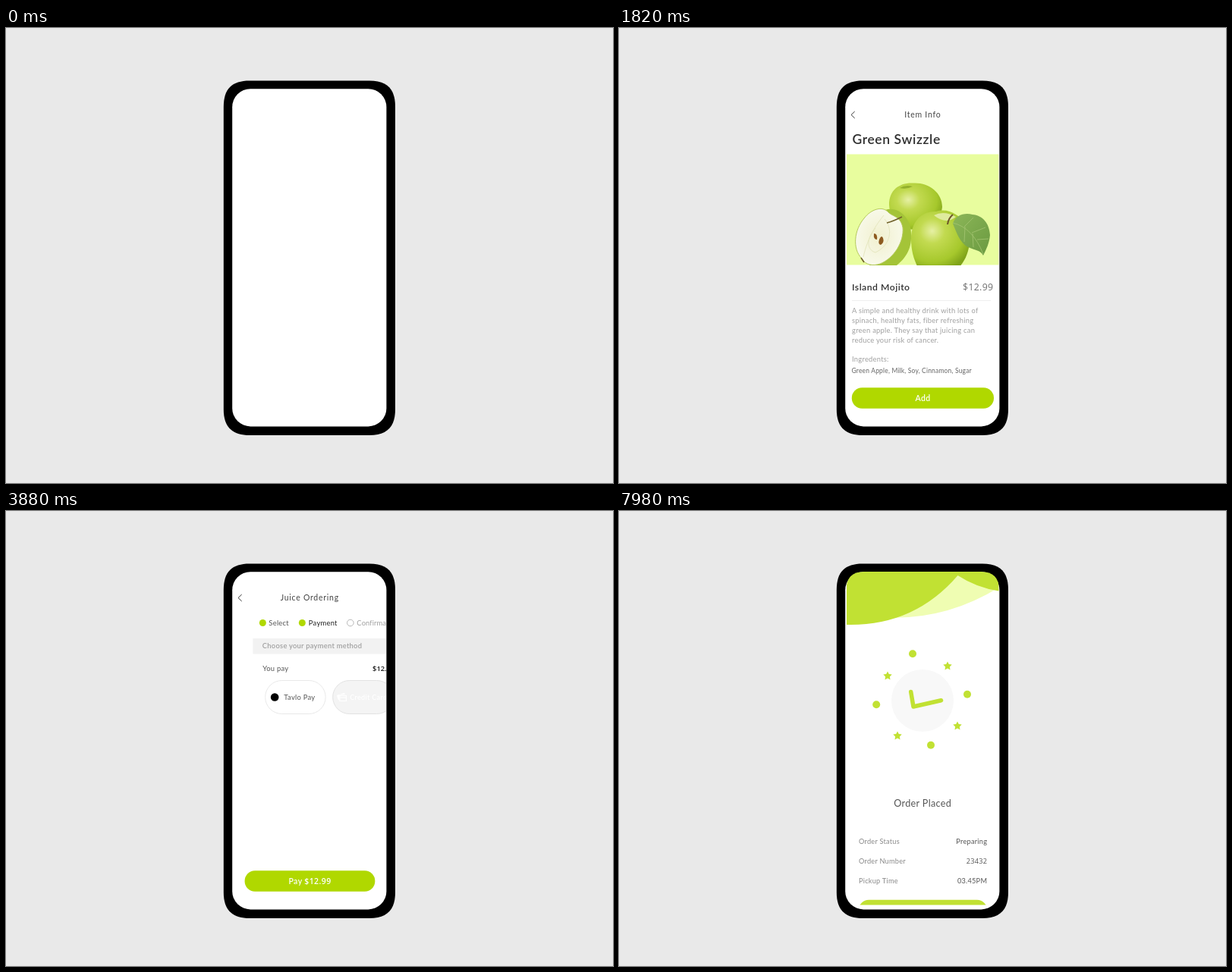
An HTML page for the animation above (8 s loop, 800 by 600 pixels).

```html
<!DOCTYPE html>
<html lang="en">
<head>
<meta charset="utf-8">
<title>Juice ordering</title>
<style>
html, body { margin: 0; width: 100%; height: 100%; overflow: hidden; background: #e9e9e9; }
svg { display: block; width: 100vw; height: 100vh; }
text { font: 9.4px Lato, "Open Sans", sans-serif; letter-spacing: .25px; fill: #555; }
.bold { font-weight: 600; }
.num { font-family: "Open Sans", sans-serif; }
.mid { text-anchor: middle; }
.end { text-anchor: end; }
.pale { fill: #a0a0a0; }
.head { font-size: 10.5px; letter-spacing: .75px; fill: #444; }
.title { font-size: 17.5px; letter-spacing: .6px; fill: #2f2f2f; }
.name { font-size: 12.2px; letter-spacing: .5px; fill: #2f2f2f; }
.price { font-size: 12.3px; letter-spacing: .3px; fill: #707070; }
.small { font-size: 8.5px; letter-spacing: .18px; fill: #666; }
.cta { font-size: 10.5px; letter-spacing: .4px; fill: #fff; }
.row { font-size: 9.2px; fill: #888; }
.value { fill: #555; }
.line { fill: none; stroke: #e8e8e8; }

/* One 8 s loop: 1% is 80 ms. */
.a { animation: 8s cubic-bezier(.33, 1, .68, 1) infinite; }
.header { animation-name: drop, show-app; }
.item { animation-name: show-item; }
.fall { animation-name: drop; }
.photo { animation-name: show-photo; }
.backdrop { animation-name: grow; transform-box: fill-box; transform-origin: 0 0; }
.fruit { animation-name: lower; }
.info { animation-name: rise, show-item; }
.button { animation-name: rise-button, show-app; }
.pill { animation-name: narrow; }
.quantity { animation-name: show-quantity; }
.payment { animation-name: show-payment; }
.slide { animation-name: slide; }
.chosen { animation-name: choose; }
.form { animation-name: show-form; }
.order { animation-name: show-order; }
.waves { animation-name: pour; }
.rows { animation-name: lift; }
.badge { animation-name: spin; transform-origin: 400px 250px; }

@keyframes drop { 0%, 7.1% { transform: translateY(-37px); } 17.1%, 100% { transform: none; } }
@keyframes rise {
  0%, 7.1% { transform: translateY(189px); }
  17.1%, 27.5% { transform: none; }
  34.5%, 100% { transform: translateY(189px); }
}
@keyframes rise-button { 0%, 7.1% { transform: translateY(240px); } 17.1%, 100% { transform: none; } }
@keyframes grow {
  0%, 27.5% { transform: translateY(0) scaleY(1); }
  34.5%, 100% { transform: translateY(-86.5px) scaleY(2.5205); }
}
@keyframes lower { 0%, 27.5% { transform: none; } 34.5%, 100% { transform: translateY(135.5px); } }
@keyframes narrow {
  0%, 27.5% { x: 306.8px; width: 187.2px; }
  34.5%, 43.5% { x: 306.3px; width: 187.2px; }
  53.5%, 100% { x: 315.8px; width: 169.5px; }
}
@keyframes slide { 0%, 43.5% { transform: translateX(200px); } 53.5%, 100% { transform: none; } }
@keyframes choose {
  0%, 64.7% { fill: #f4f4f4; stroke: #e2e2e2; }
  69.25%, 100% { fill: #b0d800; stroke: #b0d800; }
}
@keyframes pour { 0%, 97.25% { transform: translateY(-75px); } 99.75%, 100% { transform: none; } }
@keyframes lift { 0%, 97.25% { transform: translateY(55px); } 99.75%, 100% { transform: none; } }
@keyframes spin { 0%, 97.25% { transform: rotate(-50deg) scale(.5); } 99.75%, 100% { transform: none; } }

@keyframes show-app { 0%, 7.1% { opacity: 0; } 9.5%, 97.25% { opacity: 1; } 98.75%, 100% { opacity: 0; } }
@keyframes show-item { 0%, 7.1% { opacity: 0; } 9.5%, 27.5% { opacity: 1; } 31%, 100% { opacity: 0; } }
@keyframes show-photo { 0%, 7.1% { opacity: 0; } 9.5%, 43.5% { opacity: 1; } 48%, 100% { opacity: 0; } }
@keyframes show-quantity { 0%, 28.5% { opacity: 0; } 33%, 43.5% { opacity: 1; } 46.5%, 100% { opacity: 0; } }
@keyframes show-payment { 0%, 43.8% { opacity: 0; } 47.5%, 97.25% { opacity: 1; } 98.75%, 100% { opacity: 0; } }
@keyframes show-form { 0%, 64.75% { opacity: 0; } 69.25%, 100% { opacity: 1; } }
@keyframes show-order { 0%, 97.25% { opacity: 0; } 99%, 100% { opacity: 1; } }
</style>
</head>
<body>
<svg viewBox="0 0 800 600">
  <defs>
    <clipPath id="screen"><path d="M299.5 104Q299.5 80 323 80H477Q501 80 501 104V519.5H299.5Z"/></clipPath>
    <clipPath id="frame"><rect x="300" y="160" width="200.5" height="152.5"/></clipPath>
    <radialGradient id="skin" cx=".36" cy=".36" r=".72">
      <stop offset="0" stop-color="#e6f0a4"/>
      <stop offset=".3" stop-color="#c2da50"/>
      <stop offset=".75" stop-color="#a6c82c"/>
      <stop offset="1" stop-color="#7fa318"/>
    </radialGradient>
    <radialGradient id="flesh">
      <stop offset="0" stop-color="#f1f0cf"/>
      <stop offset="1" stop-color="#f8f9e9"/>
    </radialGradient>
    <linearGradient id="leaf" x2="1" y2="1">
      <stop offset="0" stop-color="#8cb658"/>
      <stop offset="1" stop-color="#6a9a40"/>
    </linearGradient>
    <path id="star" fill="#c1e133" d="M0-6 1.8-2.4 5.7-1.9 2.9.9 3.5 4.9 0 3-3.5 4.9-2.9.9-5.7-1.9-1.8-2.4Z"/>
    <circle id="dot" r="5" fill="#c1e133"/>
  </defs>

  <rect width="800" height="600" fill="#e9e9e9"/>
  <path d="M286.800 104C286.800 80 298 69.500 321 69.500H479C502 69.500 513 80 513 104V503C513 526 502 537 479 537H321C298 537 286.800 526 286.800 503Z"/>
  <rect x="298.200" y="80.200" width="203.200" height="445.200" rx="24" fill="#fff"/>

  <g clip-path="url(#screen)">
    <g class="a photo"><g class="a fall">
      <rect class="a backdrop" x="300" y="166.5" width="200.5" height="146" fill="#e8fd9e"/>
      <g class="a fruit"><g clip-path="url(#frame)">
        <path fill="url(#skin)" d="M356 233C356 214 369 204 387 204.500C407 203 426 216 426 236C424 254 411 266 393 266C371 266 357 253 356 233Z"/>
        <path fill="#93b02c" d="M370 211Q378 206 387 209Q379 213 370 211Z"/>
        <path fill="#a4c438" d="M351 240C367 234 386 250 385 273C386 293 376 305 366 313H330Z"/>
        <path fill="url(#flesh)" stroke="#b3c85a" d="M320 304C307 291 310 266 323 251C332 239 347 234 355 243C361 249 371 248 374 263C376 282 362 304 344 311C335 314 325 313 320 304Z"/>
        <path fill="none" stroke="#e6e7c0" d="M349 247C340 258 328 275 322 302M350 252C361 264 359 286 338 296C327 293 325 279 338 264"/>
        <path fill="#8d5a20" d="M336 271Q341 271 340 279Q335 279 336 271ZM343 279Q346 272 348 277Q350 283 345 286Q341 285 343 279Z"/>
        <path fill="none" stroke="#71622c" stroke-width="1.600" d="M353 257Q361 255 373 249M319 303 323 309"/>
        <path fill="url(#skin)" d="M385 278C385 255 399 241 418 242C426 239 437 241 444 246C457 253 463 268 462 284C460 299 455 308 448 316H394C388 304 385 293 385 278Z"/>
        <path fill="#dfeb9e" d="M415 247Q428 240 444 249Q431 260 415 247Z"/>
        <path fill="none" stroke="#6d552a" stroke-width="2" d="M433 259Q434 251 440 246"/>
        <path fill="url(#leaf)" d="M440 258C443 247 455 243 466 246C479 247 488 257 489 273C488 284 484 292 480 300C477 293 469 293 460 289C449 283 445 270 440 258Z"/>
        <path fill="none" stroke="#a5c673" stroke-width=".8" d="M440 257Q466 263 480 298M455 262 467 250M465 270 483 263M472 279 487 278M456 262 455 282M466 271 467 289"/>
      </g></g>
    </g></g>

    <g class="a header">
      <path fill="none" stroke="#333" d="M310.700 110 306 114.500 310.700 119"/>
      <g class="a item">
        <text class="head mid" x="400.300" y="118">Item Info</text>
        <text class="title bold" x="307.500" y="153.200">Green Swizzle</text>
      </g>
    </g>

    <g class="a info">
      <text class="name bold" x="307" y="346">Island Mojito</text>
      <text class="price num end" x="493.300" y="346">$12.99</text>
      <path stroke="#efefef" d="M307 359.500H490"/>
      <text class="pale" x="307" y="376.300">A simple and healthy drink with lots of</text>
      <text class="pale" x="307" y="389.300">spinach, healthy fats, fiber refreshing</text>
      <text class="pale" x="307" y="402.300">green apple. They say that juicing can</text>
      <text class="pale" x="307" y="415.300">reduce your risk of cancer.</text>
      <text class="pale" x="307" y="439.800">Ingredents:</text>
      <text class="small" x="306.500" y="454.800">Green Apple, Milk, Soy, Cinnamon, Sugar</text>
    </g>

    <g class="a quantity">
      <text class="head mid" x="400.300" y="118">Select Quantity</text>
      <text class="bold mid" style="font-size:16.5px;letter-spacing:.6px;fill:#262b16" x="400.300" y="172.500">Island Mojito</text>
      <text class="bold num mid" style="font-size:26.5px;letter-spacing:.4px;fill:#262b16" x="400.500" y="213">$12.99</text>
      <rect x="357.300" y="238.500" width="86.500" height="24.500" rx="12.250" fill="none" stroke="#4c5530" stroke-width=".8"/>
      <path stroke="#8b9764" d="M366.500 251H374.500"/>
      <path stroke="#4c5530" d="M426 251H434M430 247V255"/>
      <text class="num mid" style="font-size:15.5px;fill:#262b16" x="398.800" y="256.600">1</text>
      <text class="small mid" x="400.500" y="276">Quantity</text>
      <text class="small mid" style="letter-spacing:.4px;fill:#79855a" x="400.300" y="308">Prep Time: 5 mins</text>
    </g>

    <g class="a payment">
      <text class="head mid" x="400.300" y="118">Juice Ordering</text>
      <g class="a slide">
        <g fill="#b0d800"><circle cx="313" cy="147.500" r="4.500"/><circle cx="365" cy="147.500" r="4.500"/></g>
        <circle cx="428.500" cy="147.500" r="4.300" fill="none" stroke="#b5b5b5"/>
        <text x="321" y="151">Select</text>
        <text x="373.500" y="151" style="fill:#222">Payment</text>
        <text class="pale" style="letter-spacing:.1px" x="437" y="151">Confirmation</text>
        <rect x="300" y="168" width="201" height="20.500" fill="#f2f2f2"/>
        <text class="bold pale" x="312.500" y="181">Choose your payment method</text>
        <text x="312.800" y="210.600">You pay</text>
        <text class="bold num end" style="letter-spacing:0;fill:#222" x="487" y="210.600">$12.99</text>
        <rect class="line" x="316.300" y="223.500" width="79.500" height="44" rx="22"/>
        <circle cx="328.800" cy="245.500" r="5.300"/>
        <text x="341" y="249">Tavlo Pay</text>
        <rect class="a chosen" x="405.300" y="223.500" width="80" height="44" rx="22"/>
        <path fill="#fff" d="M410.500 243 420.500 240 421.500 242 414 242.500V249H412.500Z"/>
        <path fill="none" stroke="#fff" stroke-width="1.200" d="M414.500 243.500H423V250.500H414.500ZM414.500 246H423"/>
        <text class="bold" style="font-size:9.2px;fill:#fff" x="427.800" y="249">Credit Card</text>
      </g>
      <g class="a form line">
        <rect x="316.300" y="276.500" width="171.200" height="68" rx="3"/>
        <rect x="325.500" y="287.500" width="103" height="19" rx="9.500"/>
        <rect x="434.500" y="287.500" width="44" height="19" rx="9.500"/>
        <rect x="325.500" y="314.300" width="103" height="19" rx="9.500"/>
        <rect x="434.500" y="314.300" width="44" height="19" rx="9.500"/>
      </g>
    </g>

    <g class="a button">
      <rect class="a pill" x="306.800" y="474.300" width="187" height="27.500" rx="13.500" fill="#b0d800"/>
      <g class="a item"><text class="cta bold mid" x="400.500" y="491.700">Add</text></g>
      <g class="a quantity"><text class="cta bold mid" x="400.200" y="491.700">Continue to Payment</text></g>
      <g class="a payment"><text class="cta bold mid" x="400.500" y="491.700">Pay <tspan class="num">$12.99</tspan></text></g>
    </g>

    <g class="a order">
      <g class="a waves">
        <path fill="#effdb2" d="M340 80H500.500V101Q432 143 355 140.500Z"/>
        <path fill="#c1e133" d="M300 0H500.500V105.500Q471 101 446.500 85Q389 152 300 150Z"/>
      </g>
      <g class="a badge">
        <circle cx="400" cy="250" r="41" fill="#f8f8f8"/>
        <path fill="none" stroke="#c1e133" stroke-width="5.500" stroke-linecap="round" stroke-linejoin="round" d="M384.700 238.500 388 258 424.500 249.700"/>
        <use href="#dot" x="387" y="188.300"/><use href="#dot" x="459" y="241.700"/>
        <use href="#dot" x="411" y="308.700"/><use href="#dot" x="339.200" y="255.300"/>
        <use href="#star" x="433" y="204.500"/><use href="#star" x="446" y="283.500"/>
        <use href="#star" x="367" y="296.500"/><use href="#star" x="354" y="217.500"/>
      </g>
      <g class="a rows">
        <text class="mid" style="font-size:12.6px;letter-spacing:.35px" x="400.200" y="390.200">Order Placed</text>
        <text class="row" x="316" y="438.800">Order Status</text>
        <text class="row value end" x="485.200" y="438.800">Preparing</text>
        <text class="row" x="316" y="464.600">Order Number</text>
        <text class="row value num end" x="485.200" y="464.600">23432</text>
        <text class="row" x="316" y="490.500">Pickup Time</text>
        <text class="row value end" x="485.200" y="490.500">03.45PM</text>
        <rect x="315.800" y="512.700" width="169.500" height="27.500" rx="13.500" fill="#c1e133"/>
      </g>
    </g>
  </g>
</svg>
</body>
</html>
```
